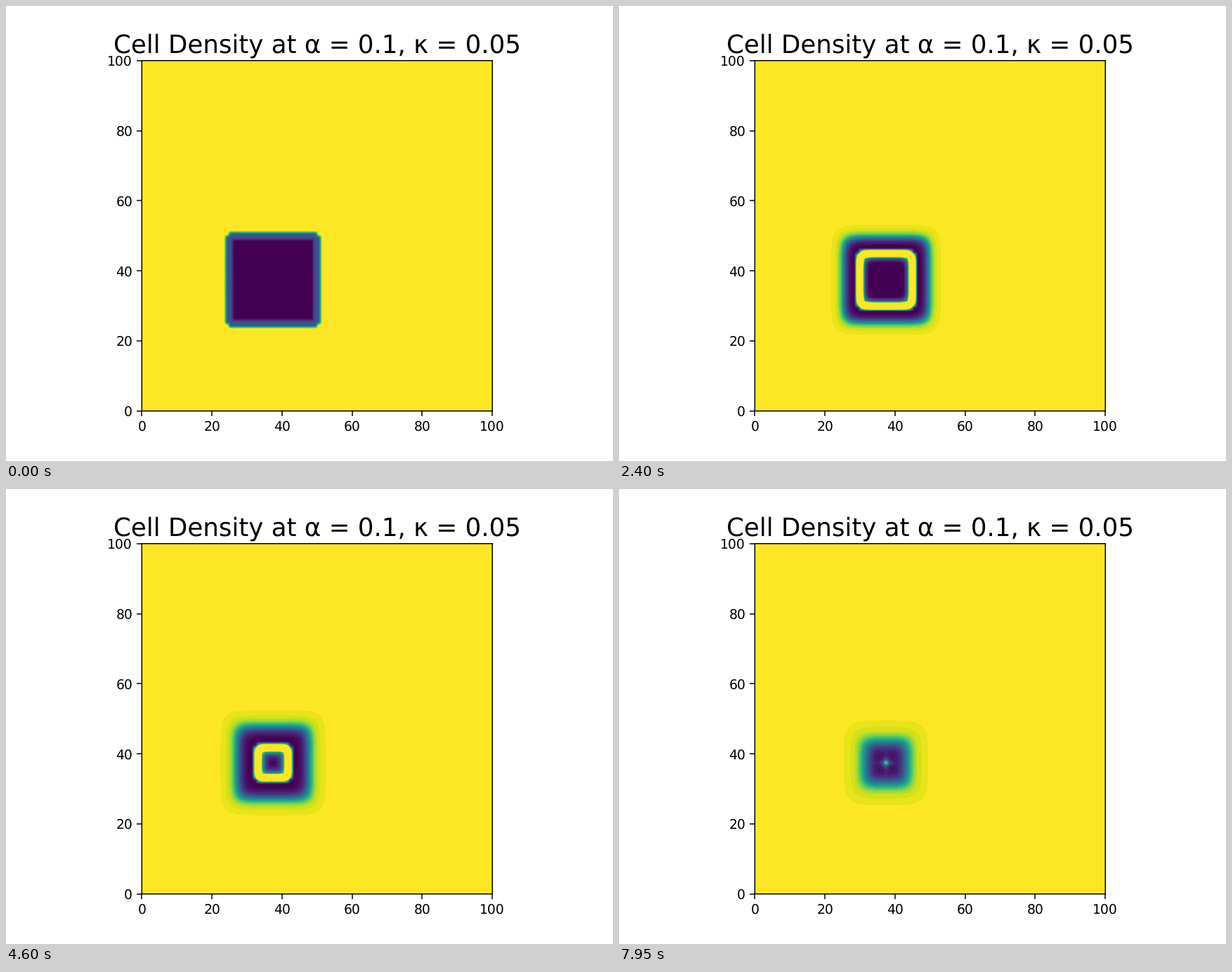
Write a matplotlib script that moves like this. It is 864 px wide and 648 px high and loops after 8000 ms.

```python
import numpy as np
import matplotlib.pyplot as plt
from matplotlib.animation import FuncAnimation

FRAMES = 160
SIZE = 100
MID = 37          # centre cell of the wound
HALF = 12         # wound half-width in cells

plt.rcParams.update({
    "font.family": "DejaVu Sans",
    "text.hinting": "none",
    "path.snap": False,
})

cells = np.abs(np.arange(SIZE) - MID).astype(float)
A, B = np.meshgrid(cells, cells)


def ramp(n, start, end):
    return float(np.clip((n - start) / (end - start), 0, 1))


def initial_density():
    """Empty square whose border cells are partly filled."""
    outer, inner = np.maximum(A, B), np.minimum(A, B)
    u = np.ones((SIZE, SIZE))
    u[(outer <= HALF + 1) & (inner <= HALF)] = 0.25
    u[outer < HALF] = 0
    return u


def front(s):
    """Missing density across the healing edge: steep core, long soft foot."""
    core = 1 / (1 + np.exp(np.clip(s / 1.1, -50, 50)))
    foot = 0.26 * np.exp(-np.clip(s, 0, None) / 2.5)
    return np.maximum(core, foot)


def density(n):
    radius = 13.4 - 0.014 * n - 0.000197 * n ** 2
    width = 0.088 * np.sqrt(n + 1)
    p = 0.45 * radius + 1.7
    r = (A ** p + B ** p) ** (1 / p)
    u = 1 - front((r - radius) / width)

    # Pulse running inwards at constant speed, its tail ahead growing longer.
    rc = 11.1 - 0.0734 * n
    pulse = 2.6 * np.clip(1 - np.abs(r - rc) / 1.25, 0, None)
    gap = rc - 1 - r
    tail = 0.8 * np.exp(-np.clip(gap, 0, None) / (n / 100 + 0.01)) * (gap > 0)
    u += np.maximum(pulse, tail) * (1 - ramp(n, 149, 161))

    # Cells left over where the pulse meets itself.
    u += 0.65 * ramp(n, 105, 159) * np.exp(-(A + B))

    mix = ramp(n, 0, 10)
    return (1 - mix) * START + mix * u


START = initial_density()

fig, ax = plt.subplots(figsize=(6.4, 4.8), dpi=135)
image = ax.imshow(START, origin="lower", extent=[0, 100, 0, 100],
                  cmap=plt.get_cmap("viridis", 32), vmin=0, vmax=1,
                  interpolation="bilinear")
ax.set_title("Cell Density at α = 0.1, κ = 0.05", fontsize=19)
ax.set_xticks(range(0, 101, 20))
ax.set_yticks(range(0, 101, 20))


def update(n):
    image.set_data(density(n))
    return [image]


anim = FuncAnimation(fig, update, frames=FRAMES, interval=50,
                     repeat=True, repeat_delay=0)
plt.show()
```
